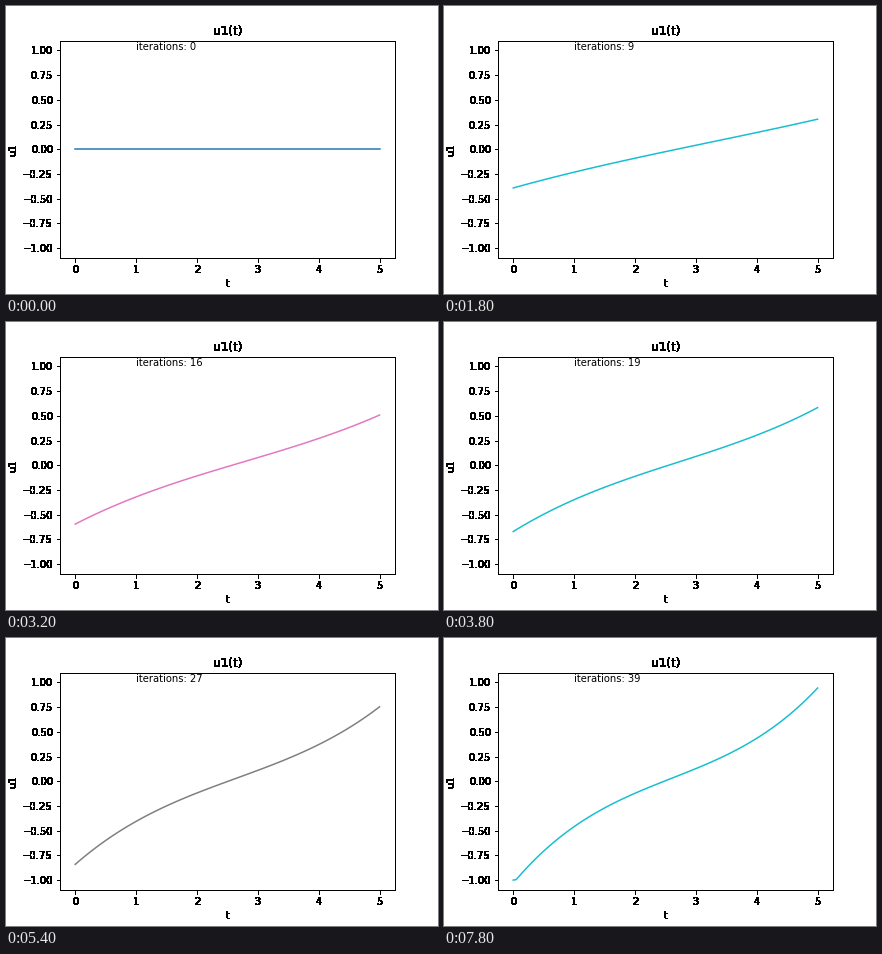
Recreate the animation shown at these times as a matplotlib script. Size 432 by 288 pixels, loop 8000 ms.

```python
import numpy as np
import matplotlib.pyplot as plt
from matplotlib.animation import FuncAnimation

FRAMES = 40
STEP_MS = 200

t = np.linspace(0, 5, 101)
x = t / 2.5 - 1


def settle(k, rate):
    return 1 - np.exp(-rate * k)


def control(k):
    """Control curve after k iterations, limited to [-1, 1]."""
    fast = settle(k, 0.7)
    cubic = 1.411 * settle(k, 0.03) + 0.014 * fast
    linear = 0.637 * settle(k, 0.08)
    even = 0.06 * settle(k, 0.043) * (1 - x**2) - 0.0435 * fast
    return np.clip(cubic * x**3 + linear * (x - x**3) + even, -1, 1)


def harden(img, dpi):
    """Make every touched pixel opaque, giving heavy, unsmoothed edges."""
    img = img.copy()
    img[..., 3] = img[..., 3] > 0
    return img, 0, 0


fig = plt.figure(figsize=(6, 4), dpi=72, facecolor="white")
fig.subplots_adjust(left=0.125, right=0.9, bottom=0.125, top=0.88)
ax = fig.add_subplot()
ax.set(xlim=(-0.25, 5.25), ylim=(-1.1, 1.1), xlabel="t", ylabel="u1",
       xticks=range(6), yticks=np.linspace(-1, 1, 9))
ax.set_title("u1(t)", fontsize=12)
for part in (ax.title, ax.xaxis, ax.yaxis, *ax.spines.values()):
    part.set_agg_filter(harden)

line, = ax.plot(t, control(0), lw=1.5)
label = ax.text(1, 1, "", fontsize=10)


def update(k):
    line.set_ydata(control(k))
    line.set_color(f"C{k % 10}")
    label.set_text(f"iterations: {k}")
    return line, label


anim = FuncAnimation(fig, update, frames=FRAMES, interval=STEP_MS,
                     repeat=True, repeat_delay=0)
plt.show()
```
